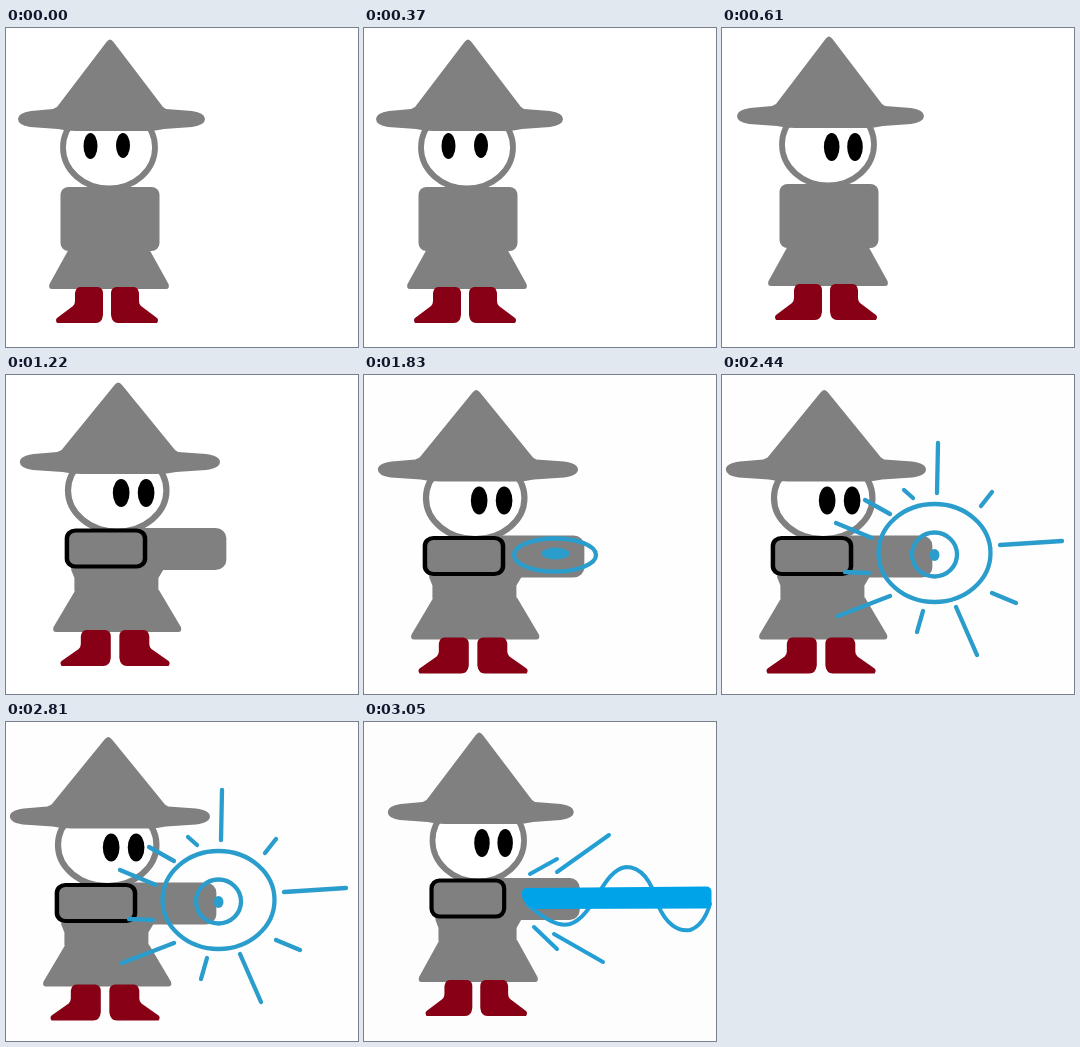
An HTML page that plays this animation: 352 by 319 pixels, repeating every 3660 ms.

```html
<!DOCTYPE html>
<html lang="en">
<head>
<meta charset="utf-8">
<title>Wizard casting a beam</title>
<style>
  html, body { margin: 0; width: 100%; height: 100%; overflow: hidden; background: #fff; }
  svg { display: block; width: 100%; height: 100%; }
  .pose {
    visibility: hidden;
    animation: show 3660ms step-end infinite;
    animation-delay: calc(var(--i) * 610ms - 3660ms);
  }
  @keyframes show {
    0% { visibility: visible; }
    16.6667%, 100% { visibility: hidden; }
  }
  .cloth { fill: #808080; }
  .boot { fill: #880015; }
  .ring { fill: none; stroke: #2a9dcc; stroke-width: 4.3; stroke-linecap: round; }
  .bolt { fill: none; stroke: #249fd6; stroke-width: 4; stroke-linecap: round; stroke-linejoin: round; }
  .glow { fill: #2a9dcc; }
  .beam { fill: #00a2e8; }
</style>
</head>
<body>
<svg viewBox="0 0 352 319">
  <defs>
    <path id="boot" class="boot" d="M74 259H92Q97 260 97 265V287Q96 295 90 295H51Q49 292 51 290L67 278Q69 276 69 273V265Q70 259 74 259Z"/>

    <g id="wizard">
      <ellipse cx="103" cy="119.5" rx="46" ry="41" fill="#fff" stroke="#808080" stroke-width="5.8"/>
      <path class="cloth" d="M100.5 14Q104 9 107.5 14L157 79L160 81L186 83Q199 85 199 91Q199 97 186 99L158 101Q150 103 140 103H70Q60 103 52 101L24 99Q12 97 12 91Q12 85 25 83L47 81L51 79Z"/>
      <path class="cloth" d="M64 219H142L162.5 256Q164 261 160 261H46Q42 261 43.5 256Z"/>
      <use href="#boot"/>
      <use href="#boot" transform="matrix(-1 0 0 1 202 0)"/>
    </g>

    <rect id="body" class="cloth" x="54.5" y="159" width="99" height="64" rx="8"/>

    <g id="gaze">
      <ellipse cx="106.7" cy="122" rx="7.8" ry="14"/>
      <ellipse cx="130" cy="122" rx="7.8" ry="14"/>
    </g>

    <g id="caster">
      <use href="#wizard"/>
      <use href="#gaze"/>
      <path class="cloth" d="M60 165H146V199L141.5 207V220H63V207L60 199Z"/>
      <rect class="cloth" x="110" y="157" width="95" height="42" rx="10"/>
      <rect class="cloth" x="56" y="159.5" width="73" height="36" rx="8" stroke="#000" stroke-width="4.2"/>
    </g>
  </defs>

  <g class="pose" style="--i:0">
    <use href="#wizard"/>
    <use href="#body"/>
    <ellipse cx="84.5" cy="118" rx="7" ry="13"/>
    <ellipse cx="117" cy="117.5" rx="7" ry="12.5"/>
  </g>

  <g class="pose" style="--i:1">
    <g transform="translate(3 -3)">
      <use href="#wizard"/>
      <use href="#body"/>
      <use href="#gaze"/>
    </g>
  </g>

  <g class="pose" style="--i:2">
    <use href="#caster" transform="matrix(1.07 0 0 1 1 -4)"/>
  </g>

  <g class="pose" style="--i:3">
    <rect width="352" height="319" fill="#fdfefd"/>
    <use href="#caster" transform="matrix(1.07 0 0 1 1 3.5)"/>
    <ellipse class="ring" cx="191" cy="180" rx="41" ry="16.5"/>
    <ellipse class="glow" cx="191.5" cy="178.5" rx="14" ry="6"/>
  </g>

  <g class="pose" style="--i:4">
    <rect width="352" height="319" fill="#fdfefd"/>
    <use href="#caster" transform="matrix(1.07 0 0 1 -9 3.5)"/>
    <ellipse class="ring" cx="212.5" cy="178" rx="56" ry="49"/>
    <ellipse class="ring" cx="212.5" cy="179.5" rx="22.5" ry="22"/>
    <ellipse class="glow" cx="212.5" cy="180" rx="5" ry="6"/>
    <path class="ring" d="M216 68L215 118M270 117L259 131M278 170L340 166M270 218L294 228M234 232L255 280M201 236L195 257M168 221L116 241M123 197L147 198M114 148L150 163M143 125L168 139M182 115L191 123"/>
  </g>

  <g class="pose" style="--i:5">
    <rect width="352" height="319" fill="#fdfdfd"/>
    <use href="#caster" transform="matrix(.995 0 0 1 11.8 -1)"/>
    <path class="bolt" d="M245 113L193 150M193 137L166 152M170 205L193 227M190 212L239 240"/>
    <path class="bolt" d="M164 183C182 198 194 205 206 202C230 195 238 148 262 145C278 145 288 160 294 183C302 202 314 210 326 208C338 204 343 192 346 182"/>
    <path class="beam" d="M162 166L343 164.5Q347.5 165 347.5 170V181Q347 186.5 341 186.5L172 187Q158 182 158 173Q157 167 162 166Z"/>
  </g>
</svg>
</body>
</html>
```
